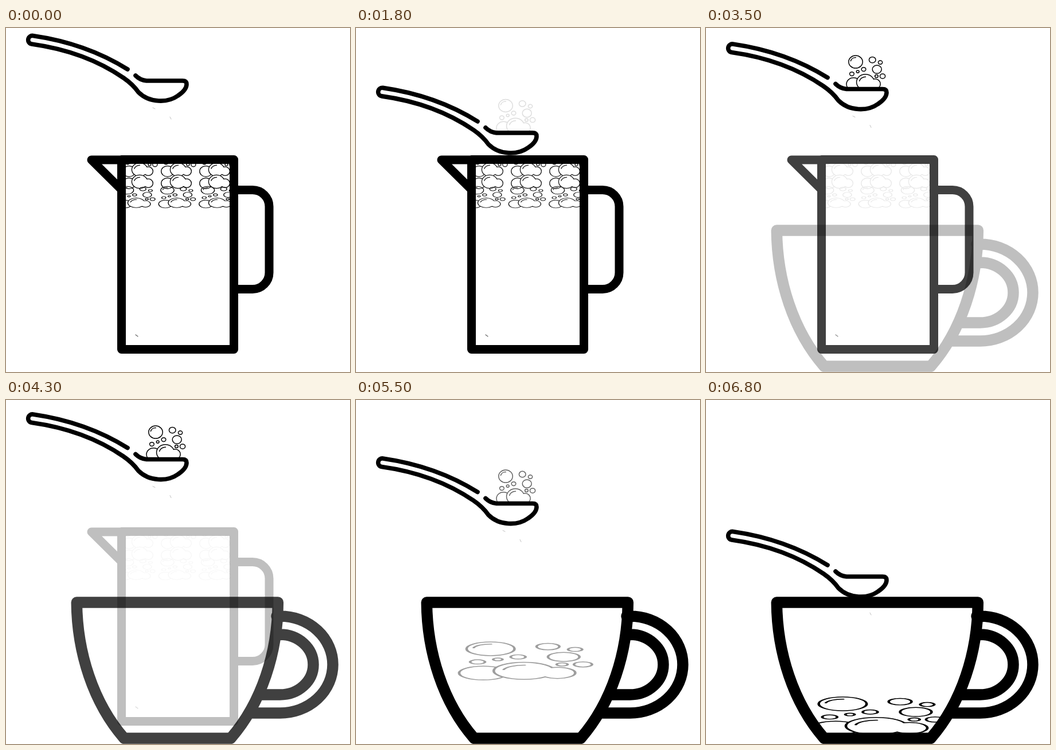
Animation, 600 px wide and 600 px high, one loop 7.8 s. Source, as an HTML page with a canvas:

```html
<!DOCTYPE html>
<html lang="en">
<head>
<meta charset="utf-8">
<title>Foam from jug to cup</title>
<style>
html, body { margin: 0; width: 100%; height: 100%; overflow: hidden; background: #fff; }
canvas { display: block; width: 600px; height: 600px; }
</style>
</head>
<body>
<canvas id="stage" width="600" height="600"></canvas>
<script>
const ctx = document.getElementById('stage').getContext('2d');
const LOOP = 7800, STEP = 100, END = 6800;
// Phase borders: dip, lift, swap of vessels, pour
const DIP = 1600, LIFT = 3100, SWAP = 4700;

const spoon = new Path2D(
  'M212 72Q140 27 47 13.5A7.3 7.3 0 0 0 45 28Q138 41 205 87Q221 98 231 112' +
  'C250 131 282 131 300 118Q315 108 315 98Q315 92 308 92H245Q234 91 226 83');

const jug = new Path2D('M201.5 282L149 230H201');
jug.rect(201.5, 229.5, 196, 331);
jug.roundRect(397.5, 282.5, 61.5, 173, [0, 29, 29, 0]);

const cupBody = new Path2D('M123.3 353H474.3C474 440 446 528 392 590H206C152 528 124 440 123.3 353Z');
const cup = new Path2D(cupBody);
for (const [rx, ry] of [[92, 84.5], [58, 52.5]]) {
  cup.moveTo(472, 461.5 - ry);
  cup.ellipse(478, 461.5, rx, ry, 0, -Math.PI / 2, Math.PI / 2);
  cup.lineTo(472 - ry / 2, 461.5 + ry);
}

// 0 before a, 1 after b, linear between
const ramp = (t, a, b) => Math.min(1, Math.max(0, (t - a) / (b - a)));

function bubble(x, y, r, from = 0, to = Math.PI * 2) {
  ctx.beginPath();
  ctx.ellipse(x, y, r, r * 0.9, 0, from, to);
  ctx.stroke();
}

function shine(x, y, r) {
  bubble(x, y + r * 0.04, r * 0.73, 3.4, 4.75);
}

function looseBubbles() {
  bubble(0, 0, 12.2);
  shine(0, 0, 12.2);
  bubble(37.2, 13, 8);
  bubble(29.2, -3.5, 5.8);
  bubble(43, 1, 3.6);
  bubble(36.4, 25, 2.8);
  bubble(47, 25, 4.6);
  for (let i = 0; i < 3; i++) bubble(14 - 10.3 * i, 13 + 4 * i, i % 2 ? 2.4 : 3.8);
}

function cloud(line) {
  bubble(-3.7, 38.8, 12.3);
  // Outline both lobes, then fill them to merge the shape
  ctx.lineWidth = line * 2;
  const lobes = new Path2D();
  lobes.ellipse(34, 38.6, 8.4, 8.2, 0, 0, Math.PI * 2);
  lobes.closePath();
  lobes.moveTo(31.7, 35.3);
  lobes.ellipse(17, 35.3, 14.7, 12.9, 0, 0, Math.PI * 2);
  ctx.stroke(lobes);
  ctx.fill(lobes);
  ctx.lineWidth = line;
  shine(17, 35.3, 14.7);
}

function foam(x, y, sx, sy, alpha, line, loose = true) {
  if (alpha <= 0) return;
  const g = Math.round(255 * (1 - alpha));
  ctx.save();
  ctx.translate(x, y);
  ctx.scale(sx, sy);
  ctx.beginPath();
  ctx.rect(-30, -20, 100, 71);
  ctx.clip();
  ctx.strokeStyle = `rgb(${g},${g},${g})`;
  ctx.fillStyle = '#fff';
  ctx.lineWidth = line;
  if (loose) looseBubbles();
  cloud(line);
  ctx.restore();
}

function outline(path, width, alpha = 1) {
  ctx.globalAlpha = alpha;
  ctx.lineWidth = width;
  ctx.stroke(path);
  ctx.globalAlpha = 1;
}

function drawJug(alpha, foamAlpha) {
  if (alpha <= 0) return;
  ctx.save();
  ctx.beginPath();
  ctx.rect(208, 236, 184, 80);
  ctx.clip();
  for (let i = 0; i < 3; i++) {
    const x = 218 + 67 * i;
    foam(x, 217, 0.89, 0.85, foamAlpha, 1.5);
    foam(x, 238, 0.89, 0.85, foamAlpha, 1.5, false);
    foam(211 + 70.5 * i, 283, 0.95, 0.62, foamAlpha, 1.5);
  }
  ctx.restore();
  outline(new Path2D('M226 535L230 538'), 1.2, alpha * 0.6);
  outline(jug, 15, alpha);
}

function drawCup(alpha, pour) {
  if (alpha <= 0) return;
  ctx.save();
  ctx.clip(cupBody);
  foam(232.4 + 6 * pour, 374.8 + 155.2 * pour, 3.43, 1.09, pour, 1.35);
  ctx.restore();
  outline(cup, 19.5, alpha);
}

function drawSpoon(y, foamAlpha) {
  ctx.save();
  ctx.translate(0, y);
  foam(261, 44.6, 1, 1, foamAlpha, 1.5);
  outline(new Path2D('M256 139L260 141M286 155L288 159'), 1, 0.25);
  outline(spoon, 7.6);
  ctx.restore();
}

function draw(t) {
  ctx.fillStyle = '#fff';
  ctx.fillRect(0, 0, 600, 600);
  ctx.strokeStyle = '#000';
  ctx.lineCap = ctx.lineJoin = 'round';

  const dip = ramp(t, 0, DIP), lift = ramp(t, DIP, LIFT);
  const swap = ramp(t, LIFT, SWAP), pour = ramp(t, SWAP, END);
  drawSpoon(102.4 * dip - 86.4 * lift - 6 * swap + 206 * pour, lift - pour);
  drawJug(1 - swap, 1 - 0.88 * lift - 0.12 * swap);
  drawCup(swap, pour);
}

const start = performance.now();
function tick() {
  const t = (performance.now() - start) % LOOP;
  draw(Math.min(END, Math.floor(t / STEP) * STEP));
  requestAnimationFrame(tick);
}
tick();
</script>
</body>
</html>
```
